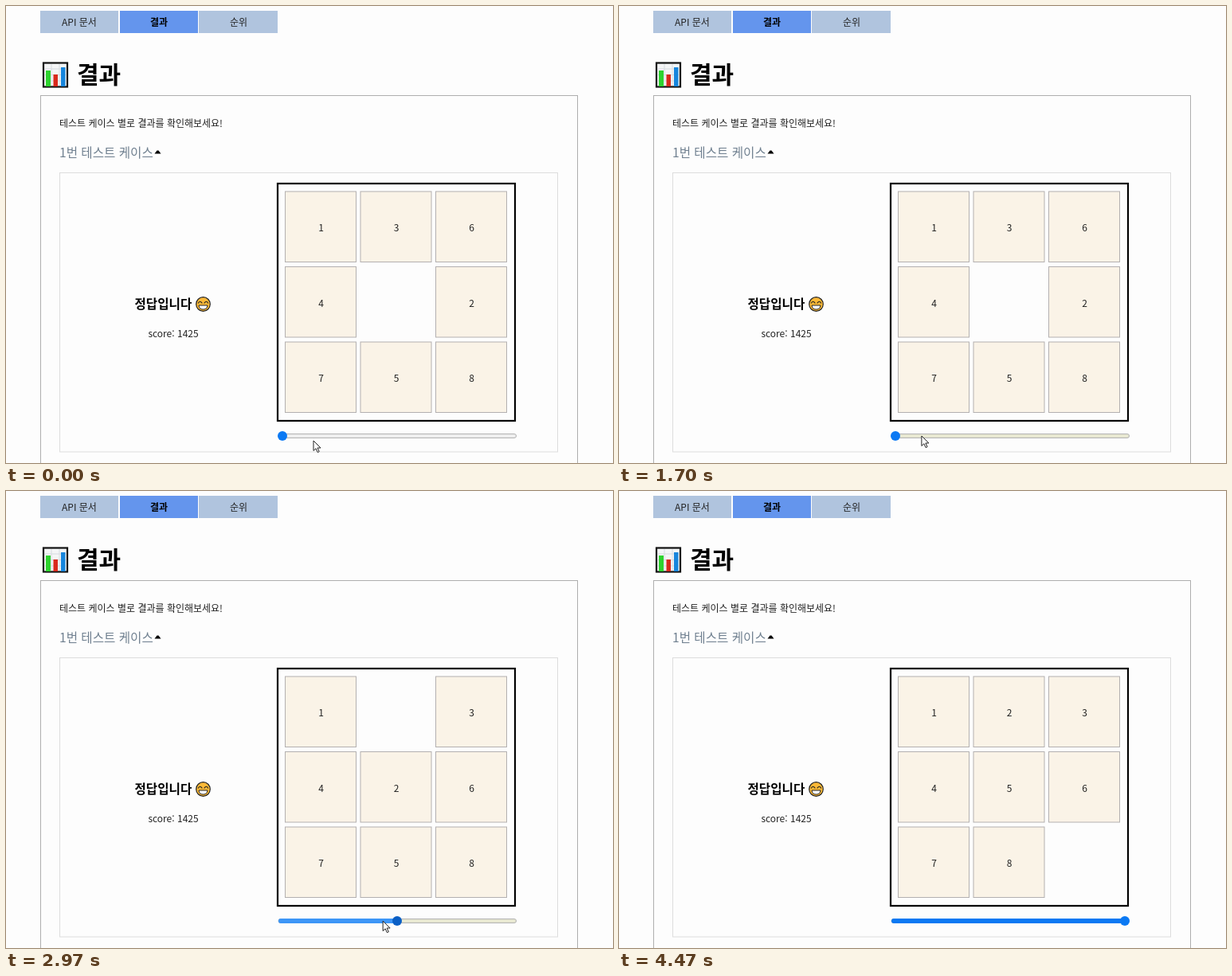
These frames come from a looping animation (762x574 px, 5.13 s). An HTML page:

```html
<!DOCTYPE html>
<html lang="ko">
<head>
<meta charset="utf-8">
<style>
  html, body { margin: 0; width: 100%; height: 100%; overflow: hidden; background: #fdfdfd; }
  svg { display: block; width: 762px; height: 574px; }
  text { font: 12px "Noto Sans CJK KR", "Noto Sans CJK", "Noto Sans", sans-serif; fill: #222; }
  .mid { text-anchor: middle; }
  .bold { font-weight: 900; fill: #000; }
  .line { fill: none; stroke-linecap: round; stroke: #222; }
</style>
</head>
<body>
<svg viewBox="0 0 762 574">
  <path d="M43 6h98v28h-98zM242 6h99v28h-99z" fill="#b0c4de"/>
  <path d="M143 6h98v28h-98z" fill="#6495ed"/>
  <text class="mid" x="92" y="24.5">API 문서</text>
  <text class="mid bold" x="192" y="24.5">결과</text>
  <text class="mid" x="292" y="24.5">순위</text>

  <rect x="47" y="71.500" width="30" height="30" fill="#f4f5f6" stroke="#111" stroke-width="2.200"/>
  <path d="M48 79h28M48 86.500h28M48 94h28M57 73v27M67 73v27" stroke="#d5dbe0"/>
  <path d="M50 81h6v20h-6z" fill="#2ed32e"/>
  <path d="M59.500 86h5.500v15h-5.500z" fill="#d9291c"/>
  <path d="M69 77h5.500v24h-5.500z" fill="#1786dd"/>
  <text class="bold" x="89" y="97" style="font-size:30px">결과</text>

  <rect x="43.500" y="112.500" width="674" height="480" fill="none" stroke="#aeaeae"/>
  <text x="67" y="152">테스트 케이스 별로 결과를 확인해보세요!</text>
  <text x="67" y="189.500" style="font-size:15.600px;fill:#708090">1번 테스트 케이스</text>
  <path d="M186.500 185.500l3-4h2l3 4z"/>
  <rect x="67.500" y="209.500" width="625" height="350.500" fill="none" stroke="#ddd"/>

  <text class="bold" x="161.500" y="380" style="font-size:15.600px">정답입니다</text>
  <circle cx="247.500" cy="374.500" r="8.800" fill="#fbb937" stroke="#222" stroke-width="1.200"/>
  <path class="line" d="M241.500 373q2-3.500 4.500 0M249 373q2.500-3.500 4.500 0" stroke-width="1.200"/>
  <path d="M242 376h11q-.5 5-5.500 5t-5.500-5z" fill="#fff" stroke="#222"/>
  <text class="mid" x="210" y="415.500">score: 1425</text>

  <rect x="341" y="223" width="298" height="298" fill="none" stroke="#000" stroke-width="2.200"/>
  <g id="tiles"></g>

  <rect id="track" x="342" y="537.500" width="298.500" height="5" rx="2.500" stroke="#b2b2b2" fill="#efefef"/>
  <rect id="fill" x="342" y="537" height="6" rx="3"/>
  <circle id="thumb" cy="540" r="6"/>
  <path id="cursor" d="M0 0v12.500l3-2.700 2.200 4.800 2-.9-2.200-4.700h4z" fill="#fff" stroke="#222"/>
</svg>
<script>
const DURATION = 5130;
const $ = id => document.getElementById(id);

// Each move slides the tile at the given cell into the gap.
const boards = [[1, 3, 6, 4, 0, 2, 7, 5, 8]];
for (const cell of [5, 2, 1, 4, 7, 8]) {
  const next = boards.at(-1).slice();
  next[next.indexOf(0)] = next[cell];
  next[cell] = 0;
  boards.push(next);
}
const moveTimes = [2430, 2700, 2900, 3240, 3560, 4030];

const BLUE = '#0b79f3', DARK = '#0b5fc5', LIGHT = '#3d96f7';
const fills = [BLUE, DARK, LIGHT, LIGHT, LIGHT, DARK, BLUE];
const thumbs = [BLUE, BLUE, DARK, DARK, DARK, BLUE, BLUE];

// Pointer path: time, x, y
const path = [
  [0, 386, 546], [30, 386, 546], [180, 366, 547], [530, 578, 500], [800, 692, 484],
  [1060, 594, 473], [1200, 527, 497], [1700, 380, 540], [1900, 358, 541],
  [2200, 387, 537], [2350, 392, 539], [2570, 433, 540], [2970, 473, 540],
  [3770, 596, 540], [4100, 636, 540], [4270, 636, 506], [4400, 674, 496]
];

const tiles = Array.from({ length: 9 }, (_, i) => {
  const x = 350.5 + i % 3 * 94.5, y = 233 + Math.floor(i / 3) * 94.5;
  $('tiles').insertAdjacentHTML('beforeend',
    `<g><rect x="${x}" y="${y}" width="89" height="88.500" fill="#faf3e7" stroke="#b3b0b0"/>
     <text class="mid" x="${x + 45}" y="${y + 50}"></text></g>`);
  return $('tiles').lastElementChild;
});

function pointerAt(t) {
  const i = path.findIndex(p => p[0] > t);
  if (i < 0) return null;
  const [t0, x0, y0] = path[i - 1], [t1, x1, y1] = path[i];
  const k = (t - t0) / (t1 - t0);
  return [x0 + (x1 - x0) * k, y0 + (y1 - y0) * k];
}

function draw(t) {
  const step = moveTimes.filter(m => m <= t).length;
  tiles.forEach((tile, i) => {
    const n = boards[step][i];
    tile.style.display = n ? '' : 'none';
    tile.lastElementChild.textContent = n;
  });

  const x = 347 + step * 48;
  $('thumb').setAttribute('cx', x);
  $('thumb').setAttribute('fill', thumbs[step]);
  $('fill').setAttribute('width', step ? x - 342 : 0);
  $('fill').setAttribute('fill', fills[step]);
  $('track').setAttribute('fill', t > 1700 ? '#e8e8d2' : '#efefef');

  const pos = pointerAt(t);
  $('cursor').style.display = pos ? '' : 'none';
  if (pos) $('cursor').setAttribute('transform', `translate(${pos})`);
}

const start = performance.now();
function tick() {
  draw((performance.now() - start) % DURATION);
  requestAnimationFrame(tick);
}
tick();
</script>
</body>
</html>
```
